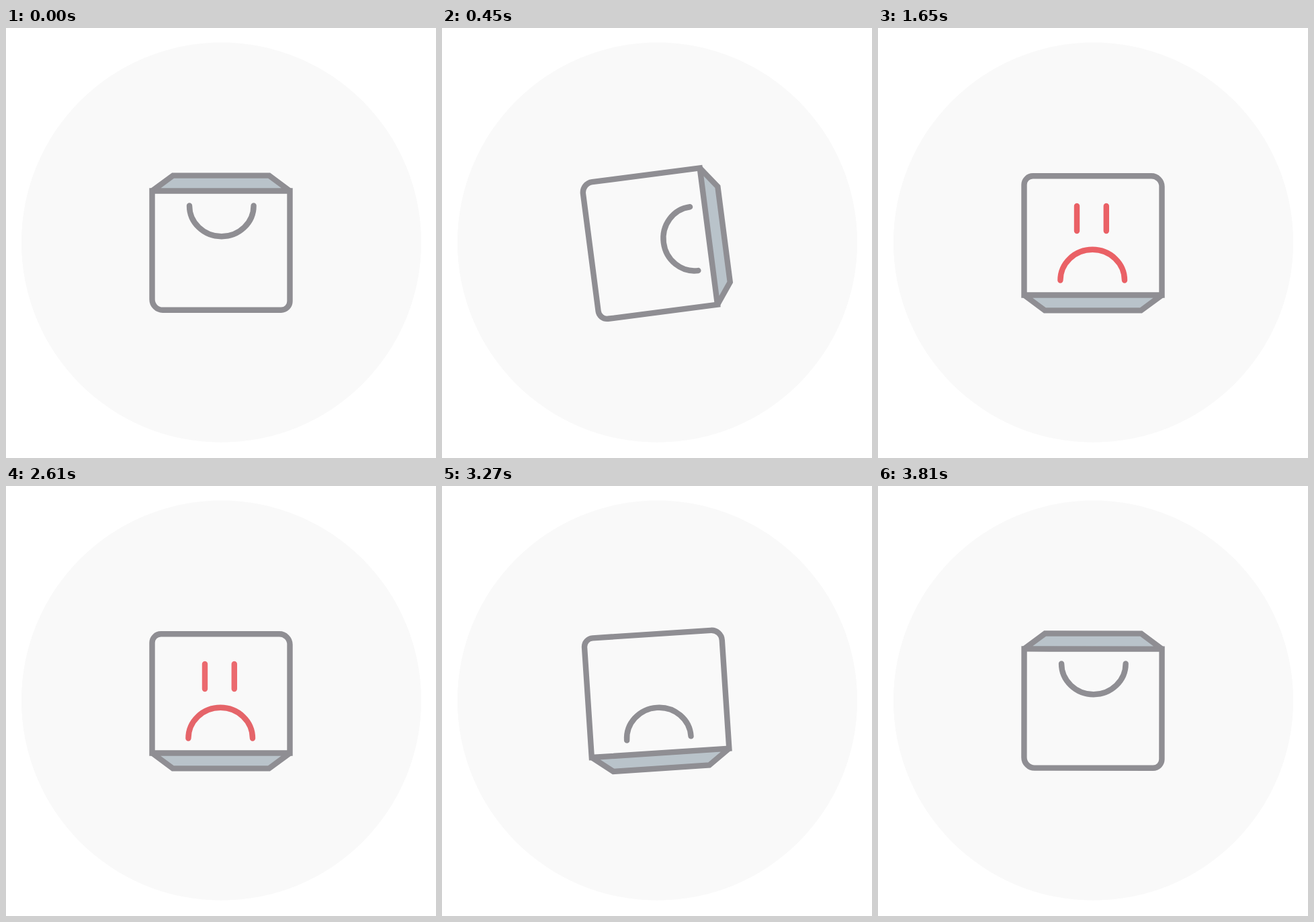
An HTML page for the animation above (4.53 s loop, 640 px wide and 640 px high).

```html
<!DOCTYPE html>
<html lang="en">
<head>
<meta charset="utf-8">
<title>Shopping bag</title>
<style>
  html, body { margin: 0; width: 100%; height: 100%; overflow: hidden; background: #fff; }
  svg { display: block; width: 100%; height: 100%; }
</style>
</head>
<body>
<svg viewBox="0 0 640 640">
  <circle cx="320.5" cy="319.2" r="297.6" fill="#f9f9f9"/>
  <g id="bag" fill="none" stroke="#8f8e93" stroke-width="8.4">
    <path d="M217.5 242.5L248.5 219.6H391.7L422.5 242.5Z" fill="#b9c3ca" stroke-miterlimit="2"/>
    <path d="M217.5 242.5V404A15.7 15.7 0 0 0 233.2 419.7H409.5A13 13 0 0 0 422.5 406.7V242.5" stroke-linecap="square"/>
    <path id="mouth" d="M273 264.4A47.8 45.8 0 0 0 368.6 264.4" stroke-linecap="round"/>
    <path id="eyes" d="M300.2 338V375M344 338V375" stroke="#ea6166" stroke-linecap="round"/>
  </g>
</svg>
<script>
const LOOP = 4530, STEP = 30;
const GRAY = [143, 142, 147], RED = [234, 97, 102];
const bag = document.getElementById('bag');
const mouth = document.getElementById('mouth');
const eyes = document.getElementById('eyes');

const clamp = v => Math.min(1, Math.max(0, v));
const span = (t, from, to) => clamp((t - from) / (to - from));

function bezier(x1, y1, x2, y2) {
  const at = (a, b, u) => 3 * (1 - u) * (1 - u) * u * a + 3 * (1 - u) * u * u * b + u * u * u;
  return x => {
    if (x <= 0 || x >= 1) return clamp(x);
    let lo = 0, hi = 1;
    for (let i = 0; i < 30; i++) {
      const mid = (lo + hi) / 2;
      if (at(x1, x2, mid) < x) lo = mid; else hi = mid;
    }
    return at(y1, y2, lo);
  };
}

const flip = bezier(0.626, 0, 0.5, 1.2);      // settles after a small overshoot
const unflip = bezier(0.67, -0.5, 0.3, 1);    // winds up before turning back

function draw(t) {
  const angle = 180 * (flip(span(t, 0, 900)) - unflip(span(t, 2910, 3825)));
  const sad = span(t, 1080, 1650) - span(t, 2580, 3090);
  const mix = GRAY.map((c, i) => Math.round(c + (RED[i] - c) * sad));
  bag.setAttribute('transform', `rotate(${angle.toFixed(3)} 320 320)`);
  mouth.setAttribute('stroke', `rgb(${mix})`);
  eyes.setAttribute('opacity', sad.toFixed(3));
}

const start = performance.now();
function tick() {
  const t = (performance.now() - start) % LOOP;
  draw(Math.floor(t / STEP) * STEP);
  requestAnimationFrame(tick);
}
draw(0);
requestAnimationFrame(tick);
</script>
</body>
</html>
```
